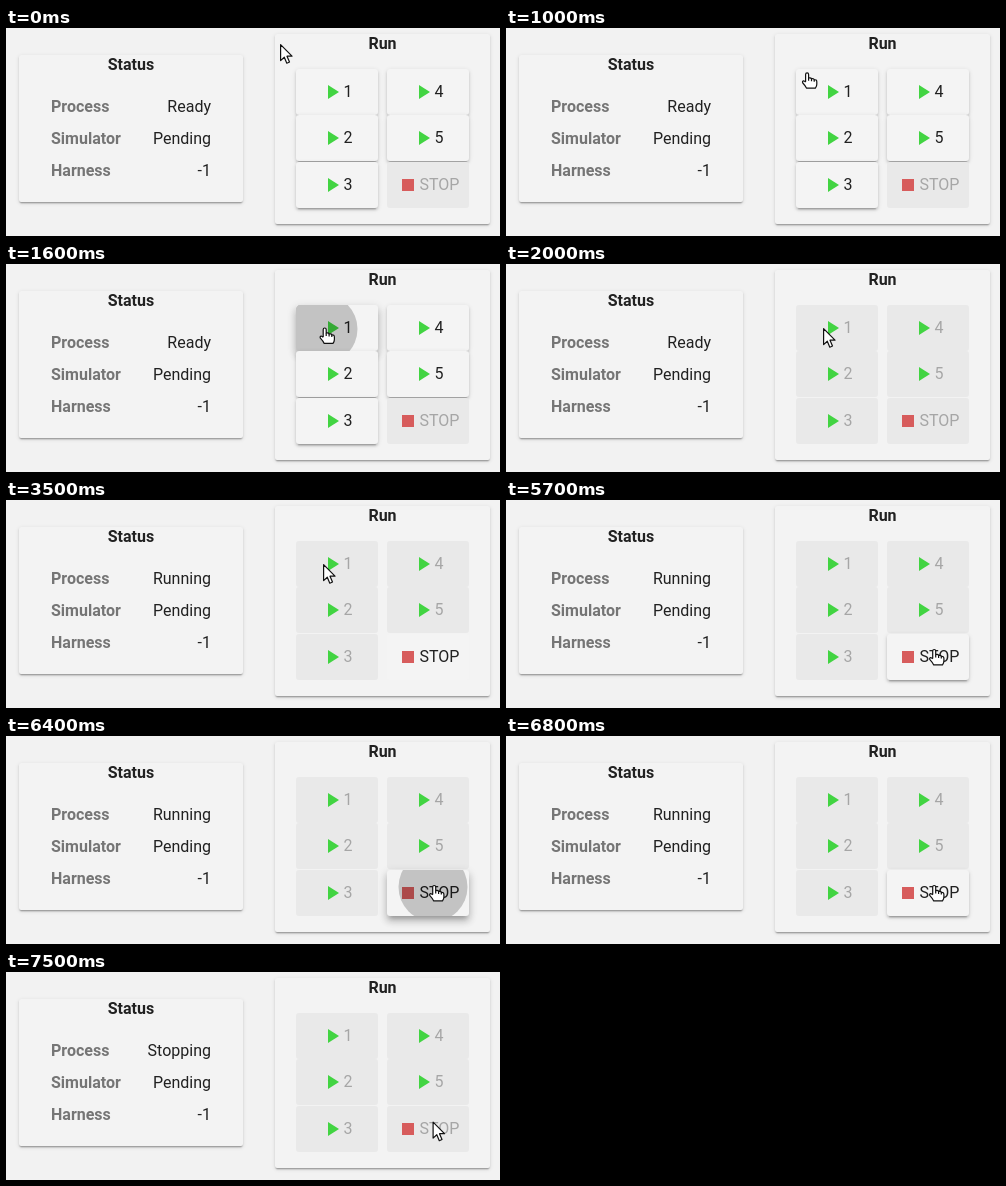
These frames come from a looping animation (494x208 px, 8 s). An HTML page:

```html
<!DOCTYPE html>
<html lang="en">
<head>
<meta charset="utf-8">
<style>
html, body { margin: 0; width: 100%; height: 100%; overflow: hidden; background: #f2f2f2; }
body { position: relative; font: 16px/32px Roboto, sans-serif; color: #212121; }
div, b, span, i, svg { position: absolute; white-space: nowrap; }
.card { border-radius: 2px; background: #f3f3f3;
  box-shadow: 0 2.5px 1.3px -1.3px #0003, 0 1.3px 1.3px #00000024, 0 1.3px 4px #0000001f; }
.title { left: 0; right: 0; text-align: center; }
.label { left: 32px; color: #757575; }
.value { right: 32px; }
.button { width: 82px; height: 46px; line-height: 46px; border-radius: 3px; overflow: hidden; }
.play { left: 32px; top: 16px; width: 11px; height: 14px; background: #42d442; clip-path: polygon(0 0, 100% 50%, 0 100%); }
.stop { left: 15px; top: 17px; width: 12px; height: 12px; background: #d75c5c; }
.ripple { border-radius: 50%; background: #000; transform: translate(-50%, -50%); }
svg { left: 0; top: 0; width: 494px; height: 208px; }
svg path { fill: #fff; stroke: #111; stroke-width: 1.2; stroke-linejoin: round; }
</style>
</head>
<body>
<div class="card" style="left:13px;top:27px;width:224px;height:147px">
  <b class="title" style="top:-6px">Status</b>
  <b class="label" style="top:36px">Process</b><span class="value" style="top:36px" id="process"></span>
  <b class="label" style="top:68px">Simulator</b><span class="value" style="top:68px">Pending</span>
  <b class="label" style="top:100px">Harness</b><span class="value" style="top:100px">-1</span>
</div>
<div class="card" style="left:269px;top:6px;width:215px;height:190px">
  <b class="title" style="top:-6px">Run</b>
</div>
<script>
const LOOP = 8000, STEP = 100;
const clamp = v => Math.max(0, Math.min(1, v));

const buttons = ['1', '2', '3', '4', '5', 'STOP'].map((name, k) => {
  const x = k < 3 ? 290 : 381, y = [41, 87, 134][k % 3], isStop = name === 'STOP';
  const el = document.createElement('div');
  el.className = 'button';
  el.style.cssText = `left:${x}px;top:${y}px`;
  el.innerHTML = `<i class="${isStop ? 'stop' : 'play'}"></i>` +
    `<span style="left:${isStop ? 32.5 : 47.5}px">${name}</span><i class="ripple"></i>`;
  document.body.append(el);
  return { el, x, y, isStop, first: k === 0, ripple: el.lastChild };
});

document.body.insertAdjacentHTML('beforeend', `<svg><g id="cursor">
  <path id="arrow" d="M.6.6V16.6L4.3 13.2L6.8 19.2L9.5 18L7 12.2H12Z"/>
  <g id="hand"><path d="M.2 9V1.6Q.2 0 1.7 0T3.2 1.6V5.2Q5.6 4.5 6.1 6Q8.3 5.3 8.8 7Q11.4 6.6 11.4 9V11.5Q11.4 13.5 10 15.4H1.2Q0 13-2.6 10.2Q-3.4 8.6-2 8.1Q-1 7.9.2 9.4"/>
  <path d="M3.2 5.2V8M6.1 6V8.5M8.8 7V9"/></g></g></svg>`);

// time, x, y of the pointer
const route = [[0, 274, 16], [100, 273, 16], [700, 273, 16], [1200, 317, 64], [5200, 317, 64],
  [5300, 336, 87], [5700, 426.5, 149.5], [LOOP, 426.5, 149.5]];

function pointerAt(t) {
  const n = Math.max(1, route.findIndex(p => p[0] >= t));
  const [a, b] = [route[n - 1], route[n]];
  const k = clamp((t - a[0]) / (b[0] - a[0]));
  return [a[1] + (b[1] - a[1]) * k, a[2] + (b[2] - a[2]) * k];
}

function shadow(on, press) {
  const layer = (y, blur, spread, alpha) => `0 ${y}px ${blur}px ${spread}px rgba(0,0,0,${alpha * on})`;
  return [
    layer(3.2 + press * 2, 1.3 + press * 4, -2 - press, .2),
    layer(2 + press * 4, 2.5 + press * 6, press, .14),
    layer(1.3 + press * 2, 5 + press * 6, press, .12)
  ].join();
}

function drawButton(b, t, px, py) {
  const on = b.isStop ? 3500 : 0, off = b.isStop ? 7300 : 1800, click = b.isStop ? 6400 : 1600;
  const enabled = t >= on && t < off;
  const level = clamp(b.isStop ? (t - on) / 200 : 1) * (1 - clamp((t - off + 100) / 300));
  const since = t - click, pressed = (b.first || b.isStop) && since >= 0 && since < 400;
  const fade = pressed ? 1 - clamp((since - 100) / 300) : 0;

  b.el.style.background = enabled ? '#f4f4f4' : '#e9e9e9';
  b.el.style.color = enabled ? '#212121' : '#a6a6a6';
  b.el.style.boxShadow = shadow(level, fade * .8);
  const size = 2 * Math.min(60, 34.5 + since * .17);
  Object.assign(b.ripple.style, {
    left: px - b.x + 'px', top: py - b.y + 1 + 'px',
    width: size + 'px', height: size + 'px', opacity: fade * .2
  });
  return enabled && px >= b.x && px < b.x + 82 && py >= b.y && py < b.y + 46;
}

const byId = id => document.getElementById(id);

function draw(now) {
  const t = Math.floor(now % LOOP / STEP) * STEP;
  const [x, y] = pointerAt(t);
  const hover = buttons.map(b => drawButton(b, t, x, y)).some(Boolean);
  byId('process').textContent = t < 3500 ? 'Ready' : t < 7300 ? 'Running' : 'Stopping';
  byId('cursor').setAttribute('transform', `translate(${x} ${y})`);
  byId('arrow').style.display = hover ? 'none' : '';
  byId('hand').style.display = hover ? '' : 'none';
}

const start = performance.now();
function tick() {
  draw(performance.now() - start);
  requestAnimationFrame(tick);
}
tick();
</script>
</body>
</html>
```
